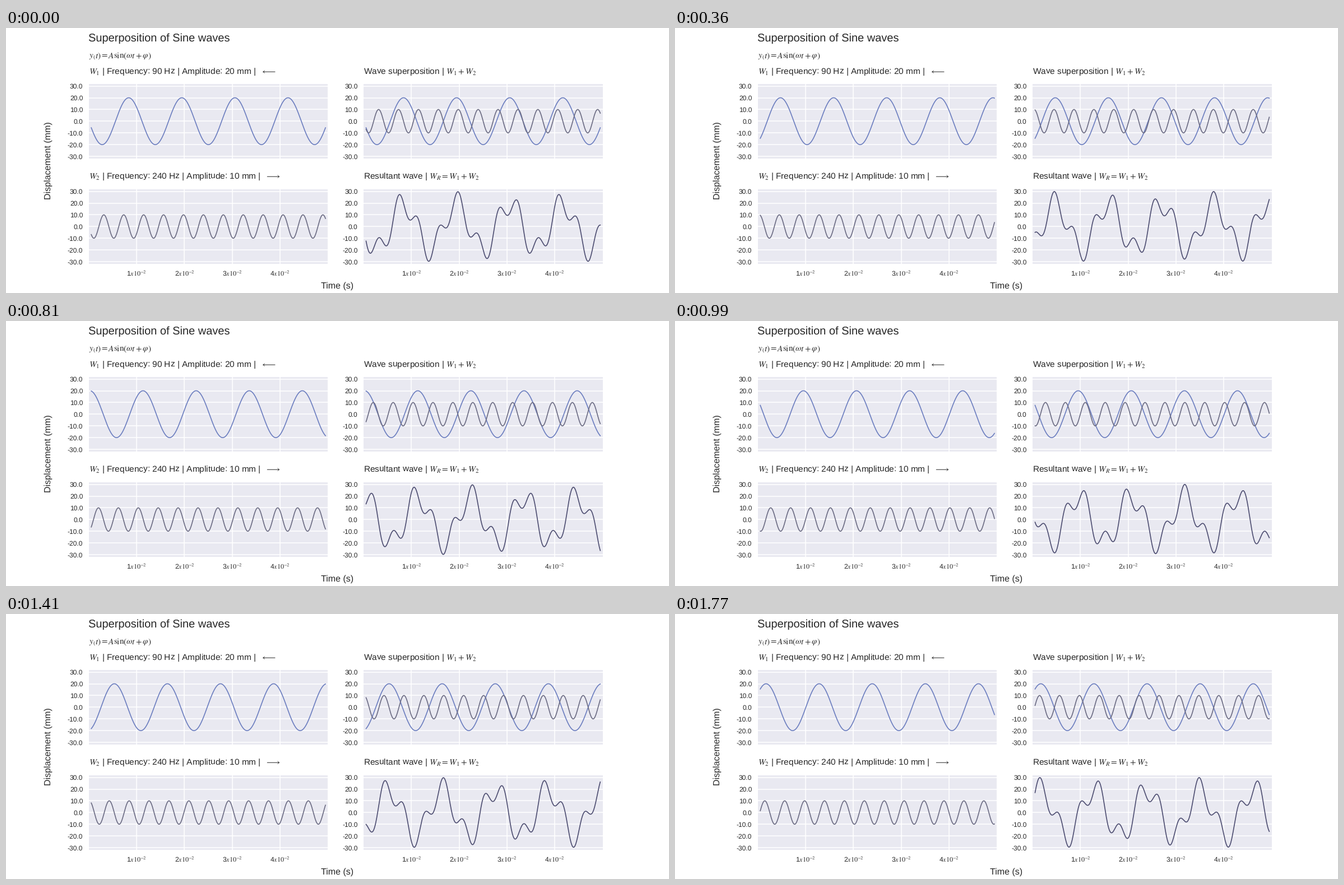
Animation, 1183 px wide and 473 px high, one loop 1800 ms. Source, as a matplotlib script:

```python
import numpy as np
import matplotlib.pyplot as plt
from matplotlib.animation import FuncAnimation

W, H, DPI = 1183, 473, 100
FRAMES, INTERVAL = 60, 30
INK = "#262626"
BLUE, GREY, DARK = "#6b7dbf", "#6b6b83", "#4c4c70"

plt.rcParams.update({
    "font.family": "Liberation Sans",
    "mathtext.fontset": "stix",
    "text.hinting": "none",
    "text.color": INK,
    "xtick.color": INK,
    "ytick.color": INK,
})


def pt(px):
    return px * 72 / DPI


def label(x, y, text, size, **kw):
    """Put text with its baseline at pixel (x, y), y counted from the top."""
    return fig.text(x / W, 1 - y / H, text, fontsize=pt(size), **kw)


def panel(left, top, show_time):
    ax = fig.add_axes([left / W, 1 - (top + PANEL_H) / H, PANEL_W / W, PANEL_H / H],
                      facecolor="#e9e9f1")
    ax.set(xlim=(0, 0.05), ylim=(-31.73, 31.73))
    ax.spines[:].set_visible(False)
    ax.set_axisbelow(True)
    ax.grid(color="white", linewidth=pt(1.6))
    marks = range(-30, 31, 10)
    ax.set_yticks(marks, [f"{m:.1f}" for m in marks])
    ax.set_xticks([k / 100 for k in range(1, 5)],
                  [f"{k}$x10^{{-2}}$" if show_time else "" for k in range(1, 5)])
    ax.tick_params(length=0, pad=pt(10.6), labelsize=pt(12))
    return ax


def wave_line(ax, color):
    return ax.plot([], [], color=color, linewidth=pt(1.65))[0]


fig = plt.figure(figsize=(W / DPI, H / DPI), dpi=DPI, facecolor="white")

PANEL_W, PANEL_H = 426.4, 132.7
LEFT, RIGHT, TOP, BOTTOM = 147.9, 638.2, 100, 288
first = panel(LEFT, TOP, False)
both = panel(RIGHT, TOP, False)
second = panel(LEFT, BOTTOM, True)
result = panel(RIGHT, BOTTOM, True)

label(147, 24, "Superposition of Sine waves", 20)
label(148, 53, r"$y_(t) = A\mathrm{sin}(\omega t + \varphi)$", 15)
label(148.2, 82.5, r"$W_1$ | Frequency: 90 Hz | Amplitude: 20 mm |  $\longleftarrow$", 15.4)
label(148.2, 270, r"$W_2$ | Frequency: 240 Hz | Amplitude: 10 mm |  $\longrightarrow$", 15.4)
label(638, 82.5, r"Wave superposition | $W_1 + W_2$", 15.4)
label(638, 270, r"Resultant wave | $W_R = W_1 + W_2$", 15.4)
label(591.5, 465, "Time (s)", 16, ha="center")
label(83, 236.5, "Displacement (mm)", 16, rotation=90, ha="right", va="center")

t = np.linspace(0.0005, 0.0495, 1000)
PHASE_STEP = 0.17

line1 = wave_line(first, BLUE)
line2 = wave_line(second, GREY)
both1 = wave_line(both, BLUE)
both2 = wave_line(both, GREY)
total = wave_line(result, DARK)
lines = [line1, line2, both1, both2, total]


def update(i):
    phase = PHASE_STEP * i
    w1 = -20 * np.sin(2 * np.pi * 90 * t + phase)
    w2 = -10 * np.sin(2 * np.pi * 240 * t - phase)
    for line, y in zip(lines, (w1, w2, w1, w2, w1 + w2)):
        line.set_data(t, y)
    return lines


anim = FuncAnimation(fig, update, frames=FRAMES, interval=INTERVAL,
                     repeat=True, repeat_delay=0)
plt.show()
```
